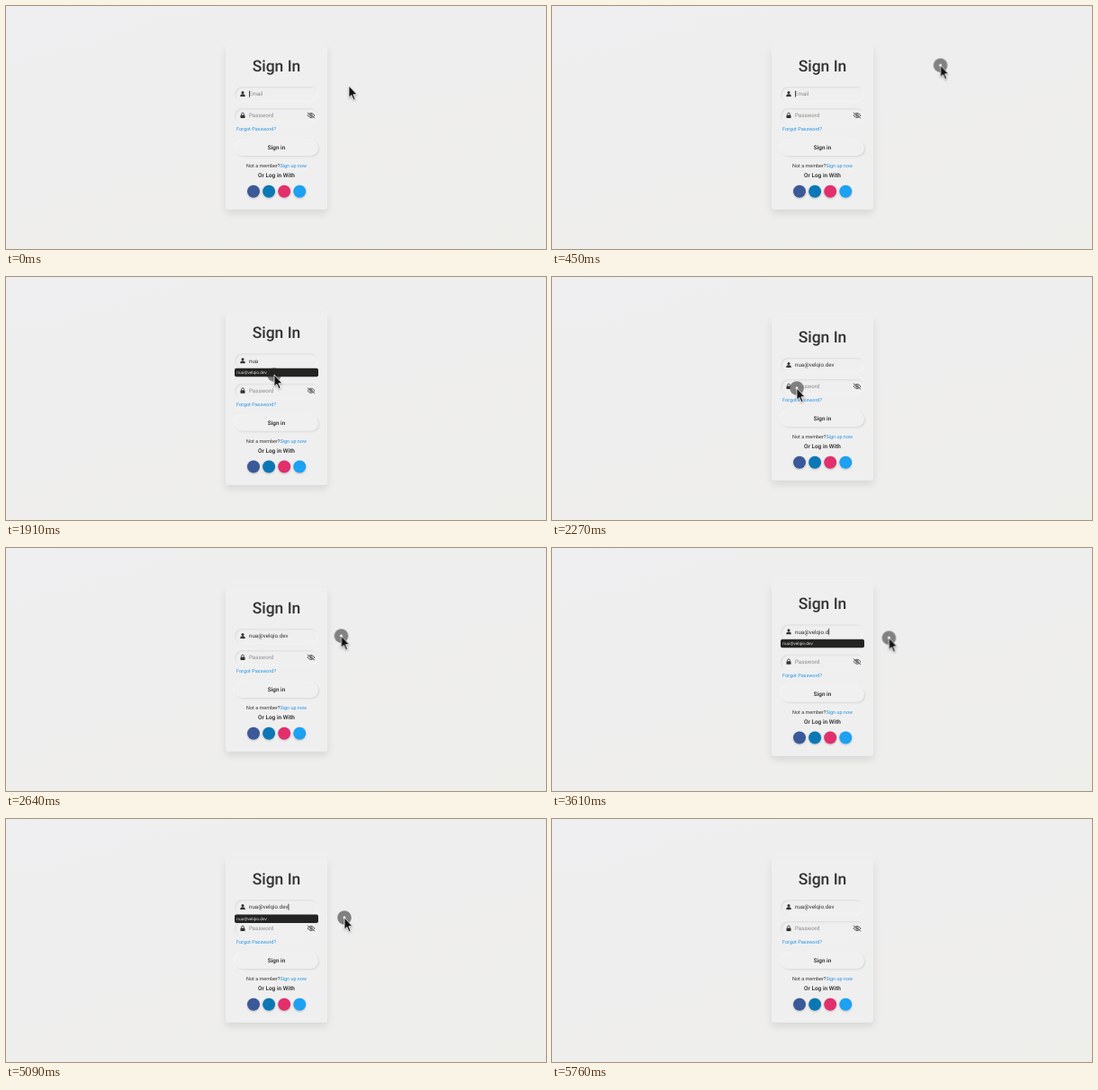
Animation of 600 by 271 pixels, one loop 6.03 s. Source, as an HTML page:

```html
<!DOCTYPE html>
<html lang="en">
<head>
<meta charset="utf-8">
<title>Sign in form</title>
<style>
  html, body { margin: 0; width: 100%; height: 100%; overflow: hidden; }
  body { position: relative; background: linear-gradient(165deg, #efeef0, #eeeeeb); }
  div, svg { position: absolute; box-sizing: border-box; }
  svg, .up, .down { left: 0; top: 0; width: 600px; height: 271px; }
  svg { overflow: hidden; font-family: Roboto, sans-serif; text-rendering: geometricPrecision; }
  #card {
    left: 244px; top: 44px; width: 113px; height: 183px; border-radius: 3px;
    background: #f0eff0;
    box-shadow: 0 4px 8px rgba(0, 0, 0, .1), 0 -4px 7px rgba(255, 255, 255, .2);
  }
  .field, .button { left: 254px; width: 93px; height: 16.5px; border-radius: 9px; }
  .field { box-shadow: inset 1px 1px 2px #dcdcdd, inset -1px -1px 2px #f4f4f4; }
  .button { top: 150px; background: #f1f0f0; box-shadow: 1px 1px 2px #d6d6d7, -1px -1px 2px #f5f5f5; }
  .mid { text-anchor: middle; }
  .input { font-size: 6.2px; fill: #333; }
  .hint { fill: #8a8a8a; }
  .small { font-size: 5.47px; fill: #333; }
  .link { fill: #2196e3; }
  .strong { font-weight: 500; fill: #222; }
  #social { filter: drop-shadow(.5px 1px 1px rgba(0, 0, 0, .2)); }
  #cursor { filter: drop-shadow(.5px 1px .8px rgba(0, 0, 0, .3)); }
  #cursor path { fill: #111; stroke: #fff; stroke-width: .8; stroke-linejoin: round; }
</style>
</head>
<body>
<div id="card"></div>

<div class="up">
  <div class="field" style="top:90px"></div>
  <svg>
    <text class="mid" x="300.5" y="73.2" font-size="17.5" font-weight="500" fill="#333">Sign In</text>
    <g fill="#333">
      <circle cx="263" cy="96.6" r="1.5"/>
      <path d="M260.3 101v-.7q0-2 2-2h1.4q2 0 2 2v.7z"/>
    </g>
    <text id="hint" class="input hint" x="270" y="100.4">Email</text>
    <g id="typed"></g>
    <rect id="caret" x="270.1" y="94.6" width=".8" height="7" fill="#222"/>
    <text id="error" class="mid" x="300.5" y="114.5" font-size="4.75" font-weight="500" fill="#e0303c">Enter a valid email address</text>
  </svg>
</div>

<div class="down">
  <div class="field" style="top:114px"></div>
  <div class="button"></div>
  <svg>
    <rect x="260.5" y="121.4" width="5" height="3.6" rx=".6" fill="#333"/>
    <path d="M261.6 121.6v-1.1a1.4 1.4 0 0 1 2.8 0v1.1" fill="none" stroke="#333" stroke-width=".8"/>
    <text class="input hint" x="270" y="124.4">Password</text>
    <g fill="none" stroke="#555" stroke-width=".9">
      <path d="M335 122q4-5.2 8 0q-4 5.2-8 0z"/>
      <circle cx="339" cy="122" r="1.3"/>
      <path d="M334.8 118.8l8.4 6.4"/>
    </g>
    <text class="small link" x="256" y="139.4">Forgot Password?</text>
    <text class="mid strong" x="300.5" y="160.4" font-size="6.4">Sign in</text>
    <text class="small" x="267" y="180.3">Not a member?<tspan class="link">Sign up now</tspan></text>
    <path id="underline" d="M304.6 181.2h29.4" stroke="#2196e3" stroke-width=".5"/>
    <text class="mid strong" x="300.5" y="191.3" font-size="6.5">Or Log in With</text>
    <g id="social"></g>
  </svg>
</div>

<svg>
  <g id="halo">
    <g id="ring">
      <circle r="7.8" fill="#777" fill-opacity=".92"/>
      <circle r="1.4" fill="#fff"/>
    </g>
  </g>
</svg>

<div class="up">
  <svg id="popup">
    <rect x="254" y="106.5" width="93" height="9.6" rx="2" fill="#242523"/>
    <text id="choice" x="256.3" y="112.9" font-size="4.5" fill="#e4e4e4" font-family="Noto Sans, sans-serif"></text>
  </svg>
</div>

<svg>
  <g id="cursor">
    <path id="arrow" d="M0 0V13.2l2.9-2.7 2.2 5.1 2-.9-2.2-5H9z"/>
    <path id="hand" transform="translate(-.5 -1) scale(1.1)" d="M2 1c0-1.4 2-1.4 2 0v4l5 .8c1.3.2 1.8 1 1.7 2.2l-.7 5.5H4L.6 8.9C-.2 7.7 1.1 6.9 2 7.7z"/>
  </g>
</svg>

<script>
const LOOP = 6030;
const EMAIL = 'nua@velqio.dev';
const SHIFT = 4.75;
const KEY_GAP = 90;
const $ = id => document.getElementById(id);

// rows: [ms, style]; the last style holds to the end of the loop
function track(el, rows, easing) {
  const frames = rows.map(([ms, style]) => ({ offset: ms / LOOP, easing, ...style }));
  frames.push({ ...frames.at(-1), offset: 1 });
  el.animate(frames, { duration: LOOP, iterations: Infinity });
}

// Visible only during the [from, to] spans, with an optional fade-in
function show(el, spans, fade = 0) {
  const rows = spans[0][0] ? [[0, 0]] : [[0, 1]];
  for (const [from, to] of spans) {
    if (from) rows.push([from, 0], [from + fade, 1]);
    if (to < LOOP) rows.push([to, 1], [to, 0]);
  }
  track(el, rows.map(([ms, opacity]) => [ms, { opacity }]), 'linear');
}

function make(tag, attrs, parent) {
  const el = document.createElementNS('http://www.w3.org/2000/svg', tag);
  for (const key in attrs) el.setAttribute(key, attrs[key]);
  return parent.appendChild(el);
}

['#3b5998', '#0b78b5', '#e1306c', '#1da1f2'].forEach((fill, i) =>
  make('circle', { cx: 275 + 17.1 * i, cy: 206.8, r: 7, fill }, $('social')));

// Typing: one letter added or removed per key press
const keys = [{ ms: 0, count: 0 }];
function typeTo(ms, count) {
  let now = keys.at(-1).count;
  for (; now !== count; ms += KEY_GAP) keys.push({ ms, count: now += Math.sign(count - now) });
}
typeTo(480, 1);
typeTo(1000, 3);
keys.push({ ms: 1990, count: EMAIL.length });
typeTo(2910, 12);
typeTo(4820, EMAIL.length);

keys.forEach((key, i) => {
  const text = make('text', { class: 'input', x: 270, y: 100.4 }, $('typed'));
  text.textContent = EMAIL.slice(0, key.count);
  key.width = key.count && text.getComputedTextLength();
  show(text, [[key.ms, keys[i + 1]?.ms ?? LOOP]]);
});
const onKeys = style => keys.map(key => [key.ms, style(key)]);

track($('caret'), onKeys(({ width }) => ({ transform: `translateX(${width}px)` })), 'step-end');
show($('caret'), [[0, 1700], [2910, 3700], [4730, 5390]]);
show($('hint'), [[0, keys[1].ms]]);
$('choice').textContent = EMAIL;
show($('popup'), [[1060, 1990], [3000, 3700], [4880, 5420]], 120);

// The form grows while the email is invalid
const invalid = ({ count }) => count > 0 && count < 13;
const grow = style => onKeys(key => style(invalid(key) ? SHIFT : 0));
const slide = dir => grow(d => ({ transform: `translateY(${dir * d}px)` }));
document.querySelectorAll('.up').forEach(el => track(el, slide(-1), 'step-end'));
document.querySelectorAll('.down').forEach(el => track(el, slide(1), 'step-end'));
track($('card'), grow(d => ({ top: `${44 - d}px`, height: `${183 + 2 * d}px` })), 'step-end');
track($('error'), onKeys(key => ({ opacity: +invalid(key) })), 'step-end');

// Pointer: rests between moves, each move slightly overshoots
const at = (x, y, easing = 'cubic-bezier(.4, 0, .4, 1.05)') =>
  ({ transform: `translate(${x}px, ${y}px)`, easing });
const path = [[0, at(381, 89)]];
function moveTo(from, to, x, y) {
  path.push([from, path.at(-1)[1]], [to, at(x, y)]);
}
function circleAround(from, to, x, y, rx, ry, start, sweep, steps = 16) {
  for (let i = 1; i <= steps; i++) {
    const angle = start + sweep * i / steps;
    const easing = i < steps ? 'linear' : undefined;
    path.push([from + (to - from) * i / steps, at(x + rx * Math.cos(angle), y + ry * Math.sin(angle), easing)]);
  }
}
moveTo(30, 580, 434, 65);
moveTo(1640, 1910, 298, 109);
moveTo(1910, 2240, 272, 124);
moveTo(2270, 2640, 372.5, 98);
moveTo(3450, 3820, 376, 102);
moveTo(4120, 4360, 329, 181.5);
circleAround(4360, 4700, 301, 138.5, 36, 64, .7, 4.3);
moveTo(4730, 5090, 376, 110);
moveTo(5090, 5270, 424, 90);
moveTo(5390, 5730, 551, -20);

track($('cursor'), path);
track($('halo'), path);
show($('ring'), [[30, 5730]]);

const overLink = [4320, 4400];
show($('hand'), [overLink]);
show($('underline'), [overLink]);
show($('arrow'), [[0, overLink[0]], [overLink[1], 5730]]);
</script>
</body>
</html>
```
